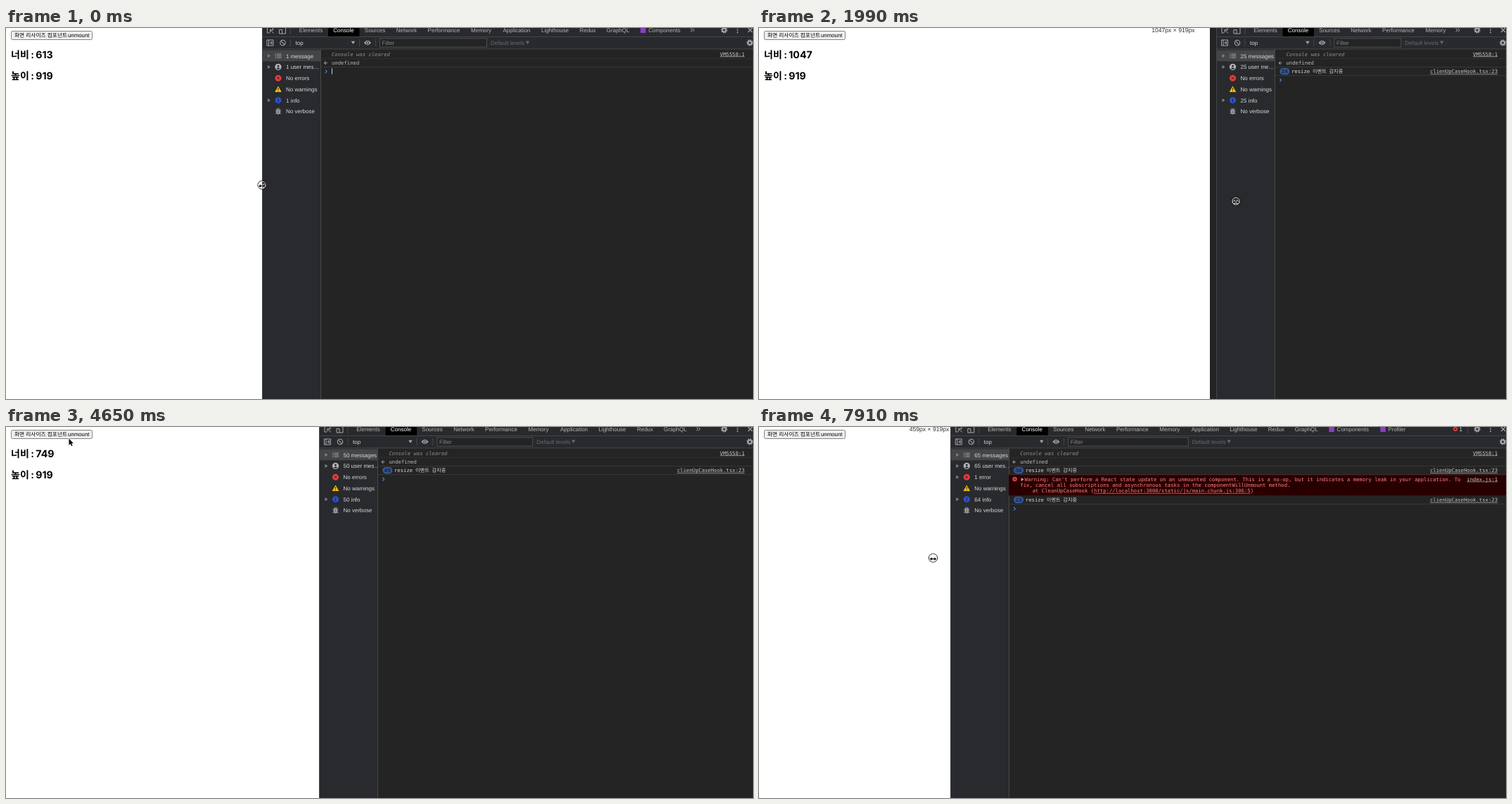
These frames come from a looping animation (1062x527 px, 8 s). An HTML page with a canvas:

```html
<!DOCTYPE html>
<html lang="ko">
<head>
<meta charset="utf-8">
<style>
  html, body { margin: 0; height: 100%; overflow: hidden; background: #fff; }
  canvas { display: block; }
</style>
</head>
<body>
<canvas id="stage" width="1062" height="527"></canvas>
<script>
const W = 1062, H = 527, LOOP = 8000;
const ctx = document.getElementById('stage').getContext('2d');
ctx.textRendering = 'geometricPrecision';

const sans = '"Liberation Sans", "Noto Sans CJK KR", "Noto Sans CJK", sans-serif';
const korean = '"Noto Sans CJK KR", "Noto Sans CJK", sans-serif';
const UI = '8px ' + sans;
const MONO = '7.25px "DejaVu Sans Mono", "Noto Sans CJK KR", monospace';
const CHAR = 4.365;
const BAR = '#292a2d', BODY = '#242424', EDGE = '#4b4d50', ICON = '#a4a7ab', TEXT = '#d6d7d9';

// The picture only changes in bursts: [first change, last change, number of changes]
const bursts = [[150, 1180, 8], [1360, 2290, 7], [2440, 3470, 8], [3620, 4650, 8],
  [4800, 5680, 7], [5980, 6130, 2], [6430, 6880, 4], [7180, 7910, 6]];
// time, panel left, gap beside the page, page width, resize events
const dragKeys = [[150, 364, 0, 613, 0], [290, 384, 9, 632, 1], [1360, 561, 9, 928, 13],
  [1980, 650.5, 9, 1047, 24], [2290, 647, 9, 1085, 27], [2440, 638, 0, 1074, 29],
  [2734, 573, 0, 963, 35], [3300, 445.5, 0, 749, 49], [7180, 445.5, 0, 749, 49],
  [7326, 432, 0, 727, 51], [7910, 272.3, 0, 459, 63]];
// time, x, y
const cursorKeys = [[0, 364, 223], [150, 368, 225], [600, 436, 246], [1360, 594, 246],
  [1980, 678, 246], [2290, 670, 246], [2440, 626, 246], [2734, 471.5, 246], [2890, 442, 246],
  [3180, 440, 236], [3470, 608, 109], [3770, 560, 108], [4650, 90, 16], [5100, 88, 13],
  [5680, 455, 184], [5980, 446, 183], [6130, 440, 182], [6430, 438, 183], [6880, 447, 183],
  [7180, 446, 183], [7326, 416, 184], [7910, 247.5, 186]];
const tabs = [['Elements', 53, 86], ['Console', 101, 131], ['Sources', 146, 175], ['Network', 191, 220],
  ['Performance', 236, 281], ['Memory', 297, 326], ['Application', 342, 382], ['Lighthouse', 397, 436],
  ['Redux', 452, 474], ['GraphQL', 490, 522], ['Components', 549, 595, true], ['Profiler', 622, 647, true]];
const warning = "Warning: Can't perform a React state update on an unmounted component. This is a no-op, " +
  'but it indicates a memory leak in your application. To fix, cancel all subscriptions and ' +
  'asynchronous tasks in the componentWillUnmount method.';

function hold(t) {
  let held = 0;
  for (const [first, last, n] of bursts) {
    if (t < first) break;
    const step = (last - first) / (n - 1);
    held = first + Math.min(n - 1, Math.floor((t - first) / step + 0.001)) * step;
  }
  return held;
}

function sample(keys, t) {
  const i = keys.findIndex(k => k[0] > t);
  if (i === 0) return keys[0].slice(1);
  if (i < 0) return keys[keys.length - 1].slice(1);
  const a = keys[i - 1], b = keys[i], f = (t - a[0]) / (b[0] - a[0]);
  return a.slice(1).map((v, j) => v + (b[j + 1] - v) * f);
}

function rect(x, y, w, h, color) { ctx.fillStyle = color; ctx.fillRect(x, y, w, h); }

function text(s, x, y, color = TEXT, font = UI, align = 'left') {
  ctx.font = font; ctx.fillStyle = color; ctx.textAlign = align;
  ctx.fillText(s, x, y);
}

function disc(x, y, r, color) {
  ctx.fillStyle = color;
  ctx.beginPath(); ctx.arc(x, y, r, 0, 7); ctx.fill();
}

function ring(x, y, r, color, width = 1) {
  ctx.strokeStyle = color; ctx.lineWidth = width;
  ctx.beginPath(); ctx.arc(x, y, r, 0, 7); ctx.stroke();
}

function path(d, x, y, stroke, fill, width = 1) {
  const p = new Path2D(d);
  ctx.save();
  ctx.translate(x, y);
  if (stroke) { ctx.strokeStyle = stroke; ctx.lineWidth = width; ctx.stroke(p); }
  if (fill) { ctx.fillStyle = fill; ctx.fill(p); }
  ctx.restore();
}

function link(s, y, color = '#c4c5c7') {
  text(s, 1050, y + 2.5, color, MONO, 'right');
  rect(1050 - s.length * CHAR, y + 3.5, s.length * CHAR, 0.6, color);
}

const expander = (x, y, color = '#7f8286') => path('M-2-2.6 2 0-2 2.6Z', x, y, null, color);
const dropdown = (x, y, color) => path('M-2.7-2H2.7L0 2.4Z', x, y, null, color);

function errorIcon(x, y, r) {
  disc(x, y, r, '#e33f43');
  const k = r * 0.4;
  path(`M${-k} ${-k} ${k} ${k}M${k} ${-k} ${-k} ${k}`, x, y, '#3a1010', null, 0.9);
}

function gear(x, y) {
  ring(x, y, 2.6, ICON, 2);
  ctx.setLineDash([1.5, 1.55]);
  ring(x, y, 3.9, ICON, 1.5);
  ctx.setLineDash([]);
}

function drawPage(t, width, showSize) {
  ctx.beginPath(); ctx.roundRect(7.5, 4.5, 115, 12, 1.8);
  ctx.fillStyle = t >= 4950 && t < 5100 ? '#e3e3e3' : '#efefef'; ctx.fill();
  ctx.strokeStyle = '#767676'; ctx.lineWidth = 0.9; ctx.stroke();
  text('화면 리사이즈 컴포넌트', 12, 13.3, '#000', '7.7px ' + korean);
  text('unmount', 88, 13.3, '#000', '7.85px ' + sans);
  if (t < 5100) {
    [['너비', width, 43], ['높이', 919, 73]].forEach(([label, value, y]) => {
      text(label, 7, y, '#000', 'bold 14px ' + korean);
      text(':', 35.3, y, '#000', 'bold 14.2px Inter, sans-serif');
      text(value, 42.2, y, '#000', 'bold 14.2px Inter, sans-serif');
    });
  }
  if (showSize) text(`${width}px × 919px`, width * 0.5941 - 2.4, 6, '#333', '8.6px ' + sans, 'right');
}

function drawTabs(p, hasError) {
  path('M4 0V-4H-4V3.5H-1M0-1 5 4M0-1V3M0-1H4', p + 11.5, 3.5, ICON);
  path('M-2-5H4V4.5H-1M-5-1H-1V4.5H-5Z', p + 29.5, 3.5, ICON);
  rect(p + 40, 0, 0.8, 9, EDGE);
  rect(p + 94, 0, 44.5, 12, '#000');
  let end = 0;
  const shown = tabs.filter(tab => p + tab[2] <= 983);
  for (const [name, left, right, marked] of shown) {
    if (marked) rect(p + left - 11, -0.5, 7.5, 7.5, '#8b3fc4');
    text(name, p + (left + right) / 2, 6, name === 'Console' ? '#fff' : '#b4b6ba', UI, 'center');
    end = p + right;
  }
  if (shown.length < tabs.length) path('M0-2.5 2.5 0 0 2.5M3-2.5 5.5 0 3 2.5', end + 14, 3, ICON);
  if (hasError) {
    errorIcon(990, 3, 3);
    text('1', 995.5, 6);
    rect(1007, 0, 0.8, 9, EDGE);
  }
  gear(1021, 3);
  [-0.2, 3, 6.2].forEach(y => disc(1040, y, 0.95, ICON));
  path('M-3-3 3 3M3-3-3 3', 1058, 3, ICON, null, 1.2);
}

function drawToolbar(p) {
  path('M-4.5-4H4.5V4H-4.5ZM-2-4V4M2.5-2 0 0 2.5 2Z', p + 11.5, 21, ICON);
  ring(p + 29.5, 21, 3.7, ICON, 1.1);
  path('M-2.6-2.6 2.6 2.6', p + 29.5, 21, ICON, null, 1.1);
  [40, 138, 161].forEach(x => rect(p + x, 16, 0.8, 10, EDGE));
  text('top', p + 47.5, 23.8);
  dropdown(p + 129.5, 20.7, ICON);
  path('M-5 0Q0-6.5 5 0Q0 6.5-5 0Z', p + 150, 21, null, ICON);
  ring(p + 150, 21, 1.8, BAR, 1);
  const w = 153 + (364 - p) * 0.2, right = p + 167 + w;
  rect(p + 167, 14.5, w, 13, '#55575a');
  rect(p + 167.8, 15.3, w - 1.6, 11.4, BODY);
  text('Filter', p + 170.5, 24, '#858789');
  text('Default levels', right + 5, 23.8, '#67696c');
  dropdown(right + 57.5, 20.5, '#67696c');
  gear(1057.5, 21);
}

function drawSidebar(p, info, hasError) {
  const total = info + hasError, plural = total > 1 ? 's' : '';
  const cut = total > 1 && total < 50 ? 'me…' : 'mes…';
  const labels = [`${total} message${plural}`, `${total} user ${cut}`, hasError ? '1 error' : 'No errors',
    'No warnings', `${info} info`, 'No verbose'];
  const x = p + 23, rowY = i => 39.6 + i * 15.77;
  rect(p, 31.5, 83, 15.7, '#444547');
  ctx.save();
  ctx.beginPath(); ctx.rect(p, 30, 82.5, H); ctx.clip();
  labels.forEach((label, i) => {
    text(label, p + 34, rowY(i) + 2.9);
    if (i < 2 || i === 4 || (i === 2 && hasError)) expander(p + 10, rowY(i));
  });
  ctx.restore();
  path('M-4.5-2.5H-3M-4.5 0H-3M-4.5 2.5H-3M-2-2.5H4.5M-2 0H4.5M-2 2.5H4.5', x, rowY(0), ICON);
  disc(x, rowY(1), 4.6, '#b4b6b9');
  disc(x, rowY(1) - 1.4, 1.5, BAR);
  path('M-2.8 2.4Q0-.8 2.8 2.4Q0 4.4-2.8 2.4Z', x, rowY(1), null, BAR);
  errorIcon(x, rowY(2), 4.5);
  path('M0-4.5 4.8 4.2H-4.8Z', x, rowY(3), null, '#f4bd0c');
  path('M0-1.8V1.2M0 2V3.2', x, rowY(3), '#33290a', null, 1.1);
  disc(x, rowY(4), 4.5, '#2b52cc');
  path('M0-2.4V-1.2M0-.4V2.5', x, rowY(4), '#10183a', null, 1.1);
  path('M-4-2.2H4M-4 .4H4M-4 3H4M-2-4.6 0-3 2-4.6', x, rowY(5), ICON, null, 0.9);
  path('M-2.5-1.5Q0-5 2.5-1.5V2Q0 6.5-2.5 2Z', x, rowY(5), null, ICON);
  path('M-1-.6H1M-1 1.8H1', x, rowY(5), BAR, null, 0.9);
}

function wrap(s, firstWidth, width) {
  const lines = [''];
  for (const word of s.split(' ')) {
    const i = lines.length - 1, next = lines[i] + (lines[i] && ' ') + word;
    if (next.length * CHAR > (i ? width : firstWidth)) lines.push(word);
    else lines[i] = next;
  }
  return lines;
}

function drawEvents(p, count, y) {
  ctx.beginPath(); ctx.roundRect(p + 90.4, y - 4.2, 12.8, 8.2, 4.1);
  ctx.fillStyle = '#2f4f8c'; ctx.fill();
  ctx.strokeStyle = '#4472bd'; ctx.lineWidth = 0.8; ctx.stroke();
  text(count, p + 96.7, y + 2.6, '#16191f', MONO, 'center');
  text('resize', p + 106.5, y + 2.5, TEXT, MONO);
  text('이벤트', p + 136.5, y + 2.5, TEXT, '7.2px ' + korean);
  text('감지중', p + 160, y + 2.5, TEXT, '7.2px ' + korean);
  link('clienUpCaseHook.tsx:23', y);
  rect(p + 83, y + 5.4, W, 0.8, '#3c3d3e');
}

function drawError(p, top) {
  const x = p + 99, width = 1003 - x, lines = wrap(warning, width - 6.3, width), red = '#ff8080';
  const height = (lines.length + 1) * 8.3 + 5;
  rect(p + 83, top, W, height, '#5c0000');
  rect(p + 83, top + 0.8, W, height - 1.6, '#290000');
  errorIcon(p + 91.3, top + 6.2, 3.3);
  expander(x + 3.3, top + 6.8, '#b9a0a0');
  lines.forEach((line, i) => text(line, x + (i ? 0 : 6.3), top + 8.8 + i * 8.3, red, MONO));
  const y = top + 8.8 + lines.length * 8.3, lead = '    at CleanUpCaseHook (';
  const url = 'http://localhost:3000/static/js/main.chunk.js:306:5';
  text(lead + url + ')', x, y, red, MONO);
  rect(x + lead.length * CHAR, y + 1, url.length * CHAR, 0.6, red);
  link('index.js:1', top + 6.3);
  return height;
}

function drawConsole(p, count, hasError, caret) {
  text('Console was cleared', p + 99, 39.5, '#8d8f91', 'italic ' + MONO);
  link('VM5558:1', 37);
  rect(p + 83, 42.8, W, 0.8, '#333435');
  path('M0-2.4-2.6 0 0 2.4M-2.4 0H1.8', p + 91, 49.7, '#b0b2b5', null, 0.9);
  text('undefined', p + 99, 52.2, '#b6b8ba', MONO);
  rect(p + 83, 55, W, 0.8, '#3c3d3e');
  let y = 61.7;
  if (count) {
    drawEvents(p, Math.min(count, 50), y);
    y += 12.4;
  }
  if (hasError) {
    y += drawError(p, y - 6.3) - 0.4;
    if (count > 50) {
      drawEvents(p, count - 50, y);
      y += 12.4;
    }
  }
  path('M-1.2-2.4 1.2 0-1.2 2.4', p + 91, y, '#3b87e0', null, 1.1);
  if (caret) rect(p + 99, y - 4.5, 0.9, 8.5, '#e4e4e4');
}

function drawCursor(t, x, y) {
  const pressed = t < 3200 || (t >= 4950 && t < 5100) || t >= 7180;
  const arrow = (t >= 2580 && t < 5980) || (t >= 6430 && t < 6730);
  if (pressed) {
    ring(x, y, 6, '#000');
    ring(x, y, 5.2, '#fff', 0.8);
  }
  const shape = arrow ? 'M0 0V9.2L2.1 7.2 3.6 10.5 5.1 9.8 3.6 6.6H6.4Z'
    : 'M-4.7 0-1.9-2.4V-.7H1.9V-2.4L4.7 0 1.9 2.4V.7H-1.9V2.4Z';
  path(shape, x - (arrow ? 0.5 : 0), y + (arrow || !pressed ? 0.6 : 1.4), '#fff', '#000', 1.1);
}

function draw(clock) {
  const t = hold(clock);
  const [p, gap, rawWidth, rawCount] = sample(dragKeys, t);
  const left = Math.floor(p), count = Math.floor(rawCount + 0.01), hasError = count >= 50;
  rect(0, 0, W, H, '#fff');
  drawPage(t, Math.round(rawWidth), (t > 200 && t < 3700) || t > 7200);
  rect(Math.floor(p - gap), 0, W, H, BODY);
  rect(left, 0, W, 30, BAR);
  rect(left, 0, 83, H, BAR);
  rect(left, 12, W, 0.8, EDGE);
  rect(left, 29.5, W, 0.8, EDGE);
  rect(left + 83, 30, 0.9, H, EDGE);
  rect(left, 0, 0.8, H, EDGE);
  drawTabs(p, hasError);
  drawToolbar(p);
  drawSidebar(p, count + 1, hasError);
  drawConsole(p, count, hasError, t < 1500 && t % 1060 < 530);
  drawCursor(t, ...sample(cursorKeys, t));
}

function loop() {
  draw(performance.now() % LOOP);
  requestAnimationFrame(loop);
}
loop();
</script>
</body>
</html>
```
